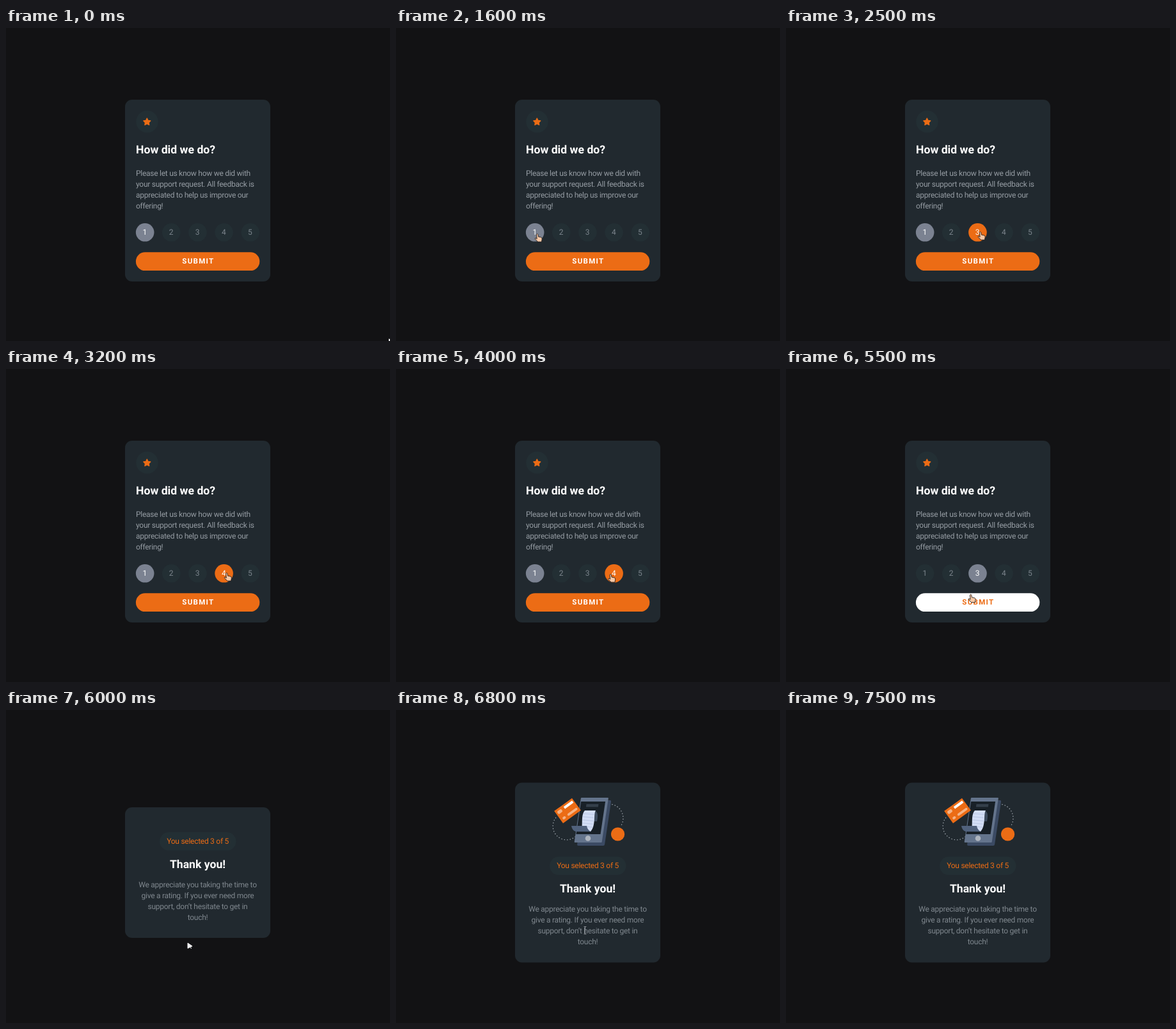
An HTML page for the animation above (7600 ms loop, 600 by 489 pixels).

```html
<!DOCTYPE html>
<html lang="en">
<head>
<meta charset="utf-8">
<title>Rating card</title>
<style>
  html, body { margin: 0; width: 100%; height: 100%; overflow: hidden; background: #121214; }
  svg { display: block; width: 600px; height: 489px; }
  text {
    font: 400 12px Roboto, "Open Sans", sans-serif;
    letter-spacing: -.27px; text-rendering: geometricPrecision; fill: #959ca3;
  }
  .mid { text-anchor: middle; }
  .title { font-size: 17.6px; font-weight: 700; letter-spacing: 0; fill: #fff; }
  .submit { font-size: 11.5px; font-weight: 700; letter-spacing: 1.3px; fill: #fff; }
  .digit { letter-spacing: 0; fill: #7c858d; }
  .dim { fill: #7f878e; }
  .panel { fill: #21292f; }
  .well { fill: #232f34; }
  .orange { fill: #ec6c15; }
</style>
</head>
<body>
<svg viewBox="0 0 600 489">
  <g id="form">
    <rect class="panel" x="186" y="112" width="227" height="284" rx="11"/>
    <circle class="well" cx="220.5" cy="146.3" r="17.3"/>
    <path id="star" class="orange" stroke="#ec6c15" stroke-width="1.4" stroke-linejoin="round"
      transform="translate(220.3 146.8)"/>
    <text class="title" x="203" y="196">How did we do?</text>
    <g id="ask"></g>
    <g id="dots"></g>
    <rect id="button" x="202.9" y="350.3" width="193.4" height="28.8" rx="14.4"/>
    <text id="label" class="submit" x="275.3" y="367.8">SUBMIT</text>
  </g>

  <g id="thanks">
    <rect id="thanksPanel" class="panel" x="186" width="227" rx="11"/>
    <g id="art">
      <path fill="none" stroke="#a4abb3" stroke-width="1.2" stroke-dasharray="1.4 3"
        d="M250 168A21 21 0 0 0 283 195M333 147A22 22 0 0 1 352 180"/>
      <g transform="translate(289 137) skewX(-8.5)">
        <rect fill="#3b4a63" x="5" y="4" width="43" height="71" rx="2"/>
        <rect fill="#64748c" width="43" height="70" rx="1"/>
        <rect fill="#182027" x="1" y="6" width="38" height="51"/>
        <rect fill="#343f4a" x="10" y="10" width="19" height="4.5"/>
      </g>
      <path fill="#3c4a5c" d="M307 157Q318 156 314 174H308Z"/>
      <path fill="#d3def5" d="M295 157H312C308 163 313 180 304 190H289C293 181 288 165 295 157Z"/>
      <path fill="none" stroke="#9fb0d4" stroke-width="17" stroke-dasharray="1 4" d="M301 162L299 183" opacity=".5"/>
      <path fill="#50617c" d="M274 181H298Q299 187 304 190H281Q275 188 274 181Z"/>
      <circle cx="300" cy="200.5" r="4.3" fill="#aeb5bf"/>
      <g transform="translate(268 157.3) rotate(-36)" fill="#f5b386">
        <rect class="orange" x="-17.2" y="-11.8" width="34.4" height="23.6"/>
        <rect fill="#fff" x="-1.5" y="-8.6" width="16.5" height="4"/>
        <rect x="-14.5" y="-8.4" width="8" height="5" rx="2"/>
        <rect x="-4" y="4" width="18.5" height="3.8" rx="1.9"/>
        <rect x="-13.5" y="4" width="5.5" height="3.8" rx="1.9"/>
      </g>
      <circle class="orange" cx="346.6" cy="194" r="10.6"/>
    </g>
    <g id="message">
      <rect class="well" x="240" y="191" width="119.5" height="28.5" rx="14.25"/>
      <text class="mid orange" x="299.6" y="209">You selected 3 of 5</text>
      <text class="mid title" x="299.5" y="247">Thank you!</text>
    </g>
  </g>

  <g id="cursor">
    <path id="arrow" fill="#f0f0f1" stroke="#f0f0f1" stroke-linejoin="round"
      d="M.6 .8V9L7.6 5.6ZM5 7L6 9.6"/>
    <path id="hand" fill="#f6c8a6" stroke="#24201f" stroke-width=".9" stroke-linejoin="round"
      d="M-1 1Q0 -1 1.4 1L1.9 4.6L6.2 5.5Q8 6 7.7 8.3L7 12.6H1.2L-3.2 8Q-3.5 6-1.5 7L-.3 8Z"/>
    <path id="beam" fill="none" stroke="#a9adb2" stroke-width=".8" d="M-2 -6H2M0 -6V5.5M-2 5.5H2"/>
  </g>
</svg>
<script>
const LOOP = 7600, STEP = 100;
const PICK = 4900, SENT = 6000, LOADED = 6100, LEFT = 7500;
const ORANGE = '#ec6c15', GREY = '#7b8291', WELL = '#232f34';
const $ = id => document.getElementById(id);

function add(parent, tag, attrs, content = '') {
  const el = document.createElementNS('http://www.w3.org/2000/svg', tag);
  for (const key in attrs) el.setAttribute(key, attrs[key]);
  el.textContent = content;
  return parent.appendChild(el);
}

function addLines(parent, x, y, cls, lines) {
  lines.forEach((line, i) => add(parent, 'text', { x, y: y + i * 17, class: cls }, line));
}

addLines($('ask'), 203, 231.3, '', [
  'Please let us know how we did with',
  'your support request. All feedback is',
  'appreciated to help us improve our',
  'offering!'
]);
addLines($('message'), 299.5, 276.5, 'mid dim', [
  'We appreciate you taking the time to',
  'give a rating. If you ever need more',
  'support, don’t hesitate to get in',
  'touch!'
]);

const starPoints = Array.from({ length: 10 }, (_, i) => {
  const r = i % 2 ? 2.9 : 5.7, a = (i / 5 - .5) * Math.PI;
  return [r * Math.cos(a), r * Math.sin(a)];
});
$('star').setAttribute('d', `M${starPoints.join('L')}Z`);

const DOT_Y = 319.3, DOT_R = 14.3;
const dots = [1, 2, 3, 4, 5].map(n => {
  const x = 176 + n * 41.15;
  return {
    n, x,
    disc: add($('dots'), 'circle', { cx: x, cy: DOT_Y, r: DOT_R }),
    text: add($('dots'), 'text', { x: x - .3, y: 323, class: 'mid digit' }, n)
  };
});

// Places where the pointer turns or rests
const onDot = n => ({ x: dots[n - 1].x + 4, y: 318.5 });
const onButton = { x: 283.4, y: 363.3 };
const route = [
  { at: 0, x: 598, y: 485 },
  { at: 500, x: 200, y: 385 },
  { at: 700, x: 188, y: 322 },
  { at: 1000, x: 175, y: 394 },
  { at: 1600, x: 220.5, y: 321.5 },
  { at: 1900, x: 214, y: 348 },
  { at: 2500, ...onDot(3) },
  { at: 2800, ...onDot(1) },
  { at: 3400, ...onDot(5) },
  { at: 3800, x: 221, y: 340 },
  { at: 4000, x: 335, y: 320.5 },
  { at: 4400, ...onDot(3) },
  { at: 5100, ...onDot(3) },
  { at: 5700, ...onButton },
  { at: 6700, ...onButton },
  { at: 7100, x: 366, y: 235 },
  { at: LOOP, x: 252, y: 143 }
];

const ease = k => (1 - Math.cos(Math.PI * k)) / 2;

function pointerAt(t) {
  const i = route.findIndex(p => p.at > t);
  const a = route[i - 1], b = route[i];
  const k = ease((t - a.at) / (b.at - a.at));
  return { x: a.x + (b.x - a.x) * k, y: a.y + (b.y - a.y) * k };
}

const show = (id, on) => $(id).style.display = on ? '' : 'none';

function draw(t) {
  const { x, y } = pointerAt(t);
  const done = t >= SENT, loaded = t >= LOADED;
  const picked = t >= PICK ? 3 : 1;
  const hovered = done ? null : dots.find(d => Math.hypot(x - d.x, y - DOT_Y) < DOT_R);
  const overButton = !done && x > 203 && x < 396 && y > 350.5 && y < 379;

  show('form', !done);
  show('thanks', done);
  for (const d of dots) {
    d.disc.style.fill = d.n === picked ? GREY : d === hovered ? ORANGE : WELL;
    d.text.style.fill = d.n === picked || d === hovered ? '#fff' : '';
  }
  $('button').style.fill = overButton ? '#fff' : ORANGE;
  $('label').style.fill = overButton ? ORANGE : '#fff';

  const panel = $('thanksPanel');
  panel.setAttribute('y', loaded ? 113.5 : 152);
  panel.setAttribute('height', loaded ? 281 : 204);
  $('message').setAttribute('transform', `translate(0 ${loaded ? 38.3 : 0})`);
  show('art', loaded);

  const hand = hovered || overButton;
  const beam = loaded && y > 235;
  show('hand', hand);
  show('beam', beam);
  show('arrow', !hand && !beam);
  show('cursor', t < LEFT);
  $('cursor').setAttribute('transform', `translate(${x} ${y})`);
}

const start = performance.now();
function tick() {
  const t = (performance.now() - start) % LOOP;
  draw(Math.floor(t / STEP) * STEP);
  requestAnimationFrame(tick);
}
tick();
</script>
</body>
</html>
```
